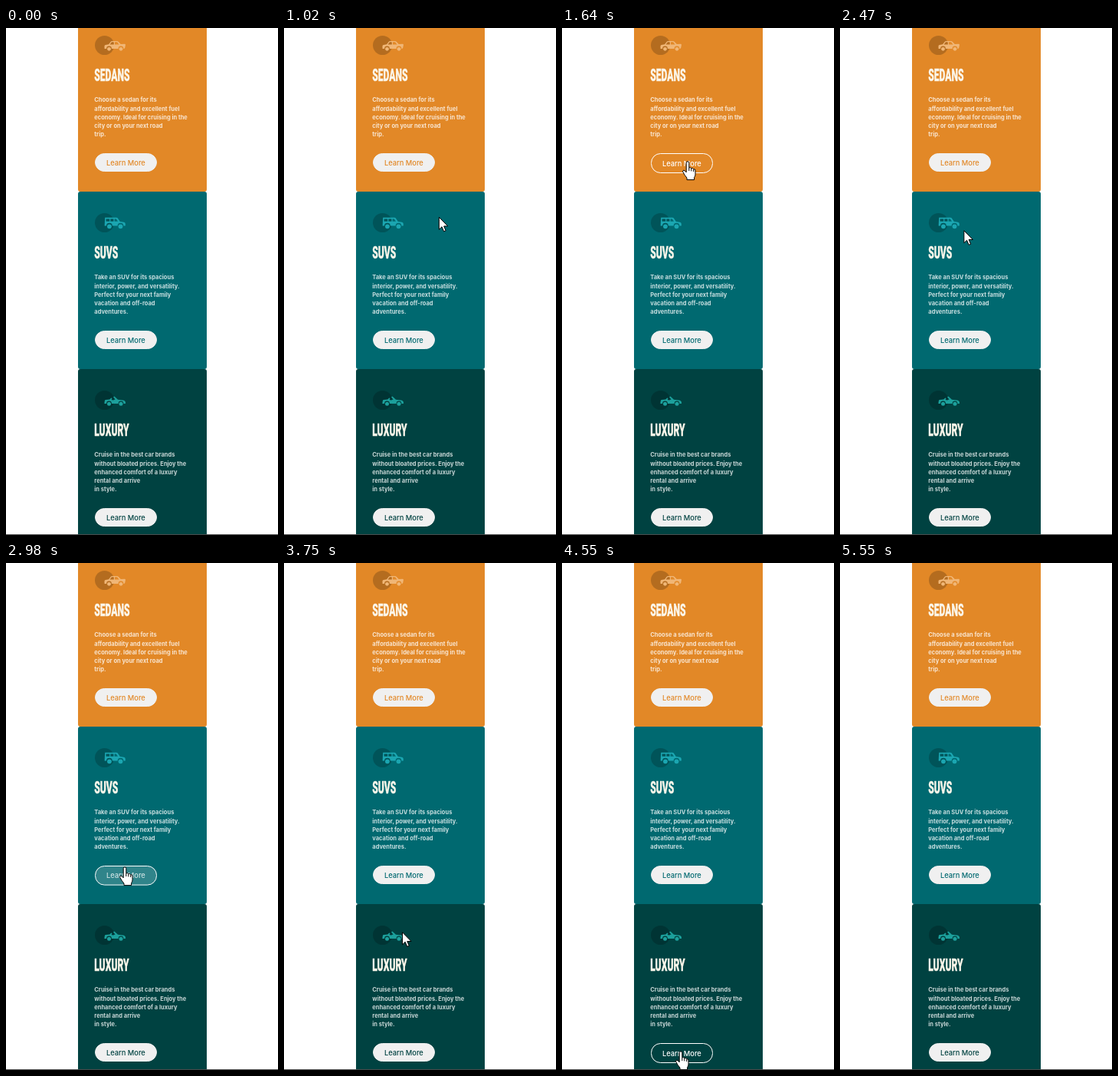
Write an HTML page that moves like this. It is 355x660 px and loops after 6.34 s.

```html
<!DOCTYPE html>
<html lang="en">
<head>
<meta charset="utf-8">
<title>Car cards</title>
<style>
  html, body { margin: 0; width: 100%; height: 100%; overflow: hidden; background: #fff; }
  svg { display: block; }
  text { font-family: Inter, sans-serif; }
  .title { font: 900 22px Roboto, sans-serif; fill: #fbf6ea; stroke: #fbf6ea; stroke-width: .4; }
  .copy { font-size: 7.5px; font-weight: 650; fill: #fff; fill-opacity: .78; }
  .label { font-size: 9.3px; font-weight: 500; text-anchor: middle; }
  .cursor path { fill: #fff; stroke: #000; stroke-linejoin: round; }
</style>
</head>
<body>
<svg id="stage" width="355" height="660" viewBox="0 0 355 660"></svg>
<script>
const LOOP = 6340, STEP = 231, FADE = 300;

// hover: [start, end] of the pointer resting on the card's button
const cards = [
  {
    title: 'SEDANS', color: '#e28827', carColor: '#f0b676', hover: [1290, 2290],
    copy: ['Choose a sedan for its', 'affordability and excellent fuel',
      'economy. Ideal for cruising in the', 'city or on your next road', 'trip.'],
    car: 'M128.5 27v-3.5q0-1.3 1.5-1.6l4-.6 3-3.7q.5-.6 1.4-.6h6.6q.9 0 1.6.7l3.2 3.4 5-.3q1.3 0 1.1 1.4l-.6 3.4q-.2 1.4-1.4 1.4h-.5a3.4 3.4 0 0 0-6.8 0h-8.7a3.4 3.4 0 0 0-6.8 0zM135.6 21.4l2.4-3.1h2.8v3.1zM142 18.3h3l2.6 3.1h-5.6z',
    wheels: [134.5, 150], radius: 2.4
  },
  {
    title: 'SUVS', color: '#006970', carColor: '#1ba6b1', hover: [2830, 3650],
    copy: ['Take an SUV for its spacious', 'interior, power, and versatility.',
      'Perfect for your next family', 'vacation and off-road', 'adventures.'],
    car: 'M128.6 26.6l.6-10.9h14.8q1.2 0 1.8.9l3 4.4 5 .8q2 .3 2 2.2v2.6h-2.4a3.9 3.9 0 0 0-7.8 0h-6.8a3.9 3.9 0 0 0-7.8 0zM130.6 20.8v-3.4h4.6v3.4zM136.4 20.8v-3.4h4v3.4zM141.6 20.8v-3.4h2.2l2.2 3.4z',
    wheels: [134.9, 149.5], radius: 2.9
  },
  {
    title: 'LUXURY', color: '#004241', carColor: '#1ca09c', hover: [4250, 5250],
    copy: ['Cruise in the best car brands', 'without bloated prices. Enjoy the',
      'enhanced comfort of a luxury', 'rental and arrive', 'in style.'],
    car: 'M128.3 27l.6-4q.2-1 1.4-1.1l5-.5 2-2 1.2.6-.9 2 2.4.4 2.6-.8-2.6-3.2 1.4-.9 4.6 4.2 6.4.8q3.3.5 3.5 2.6l.1 1.9h-2.6a3.4 3.4 0 0 0-6.8 0h-8.7a3.4 3.4 0 0 0-6.8 0z',
    wheels: [134.5, 150], radius: 2.5
  }
];

// Pointer path: [time, x, y]
const path = [
  [660, 338, 645], [1020, 202, 246], [1260, 168, 190], [1640, 164, 174],
  [2250, 164, 174], [2500, 161, 275], [2830, 155, 394], [2980, 155, 396],
  [3410, 155, 404], [3630, 155, 404], [3750, 154, 480], [4260, 154, 630],
  [4550, 155, 636], [5210, 155, 636], [5330, 200, 606], [5550, 290, 650]
];

const drawCard = (c, i) => `
  <g transform="translate(0 ${i * STEP})">
    <rect x="94" y="-18" width="168" height="${STEP}" rx="3" fill="${c.color}"/>
    <circle cx="128.6" cy="22.5" r="12.6" fill-opacity=".2"/>
    <g fill="${c.carColor}">
      <path fill-rule="evenodd" d="${c.car}"/>
      ${c.wheels.map(x => `<circle cx="${x}" cy="27.3" r="${c.radius}"/>`).join('')}
    </g>
    <text class="title" transform="translate(115.2 69.2) scale(.55 1)">${c.title}</text>
    ${c.copy.map((s, n) => `<text class="copy" x="115.3" y="${96.3 + n * 11.25}">${s}</text>`).join('')}
    <rect class="button" x="116.5" y="163.5" width="80" rx="12" fill="#f0f0f0"/>
    <text class="label" x="156.4">Learn More</text>
  </g>`;

const stage = document.getElementById('stage');
stage.innerHTML = cards.map(drawCard).join('') + `
  <rect y="659" width="355" height="1" fill="#4a4a4a"/>
  <g class="cursor">
    <path id="arrow" d="M.5.5v16l3.7-3.5 2.5 6 2.6-1-2.5-5.8h5.2z"/>
    <path id="hand" d="M-1.8 1.6a1.8 1.8 0 0 1 3.6 0v6.2q2.2-.6 3 .8 2.2-.5 2.9 1 2.3-.3 2.3 2v5q0 2-1.4 4v3h-9.6v-2.4q-3-3.6-5.2-7.8-.6-1.8 1-2.2 1.4 0 3.4 2.6zM1.8 8v4M4.8 9v3.4M7.7 10v3"/>
  </g>`;

const buttons = stage.querySelectorAll('.button');
const labels = stage.querySelectorAll('.label');
const cursor = stage.querySelector('.cursor');
const arrow = document.getElementById('arrow');
const hand = document.getElementById('hand');

const show = (el, on) => el.setAttribute('visibility', on ? 'visible' : 'hidden');
const isOver = ({ hover: [start, end] }, t) => t >= start && t < end;
const mix = (from, to, p) => `color-mix(in srgb, ${to} ${p * 100}%, ${from})`;

// The button fades in on hover and snaps back when the pointer leaves
function drawButton(i, t) {
  const card = cards[i], button = buttons[i], label = labels[i];
  const u = isOver(card, t) ? Math.min(1, (t - card.hover[0]) / FADE) : 0;
  const p = 1 - (1 - u) ** 2.3;
  button.setAttribute('height', 23 + 2 * p);
  button.setAttribute('fill-opacity', 1 - p);
  button.style.stroke = mix('#f0f0f0', '#fff', p);
  label.setAttribute('y', 178.6 + p);
  label.style.fill = mix(card.color, '#fff', p);
}

function drawCursor(t) {
  const n = path.findIndex(k => k[0] > t);
  const visible = n > 0;
  const over = cards.some(card => isOver(card, t));
  show(arrow, visible && !over);
  show(hand, visible && over);
  if (!visible) return;
  const [t0, x0, y0] = path[n - 1], [t1, x1, y1] = path[n];
  const u = (t - t0) / (t1 - t0);
  cursor.setAttribute('transform', `translate(${x0 + (x1 - x0) * u} ${y0 + (y1 - y0) * u})`);
}

function frame() {
  const t = performance.now() % LOOP;
  cards.forEach((_, i) => drawButton(i, t));
  drawCursor(t);
  requestAnimationFrame(frame);
}
frame();
</script>
</body>
</html>
```
